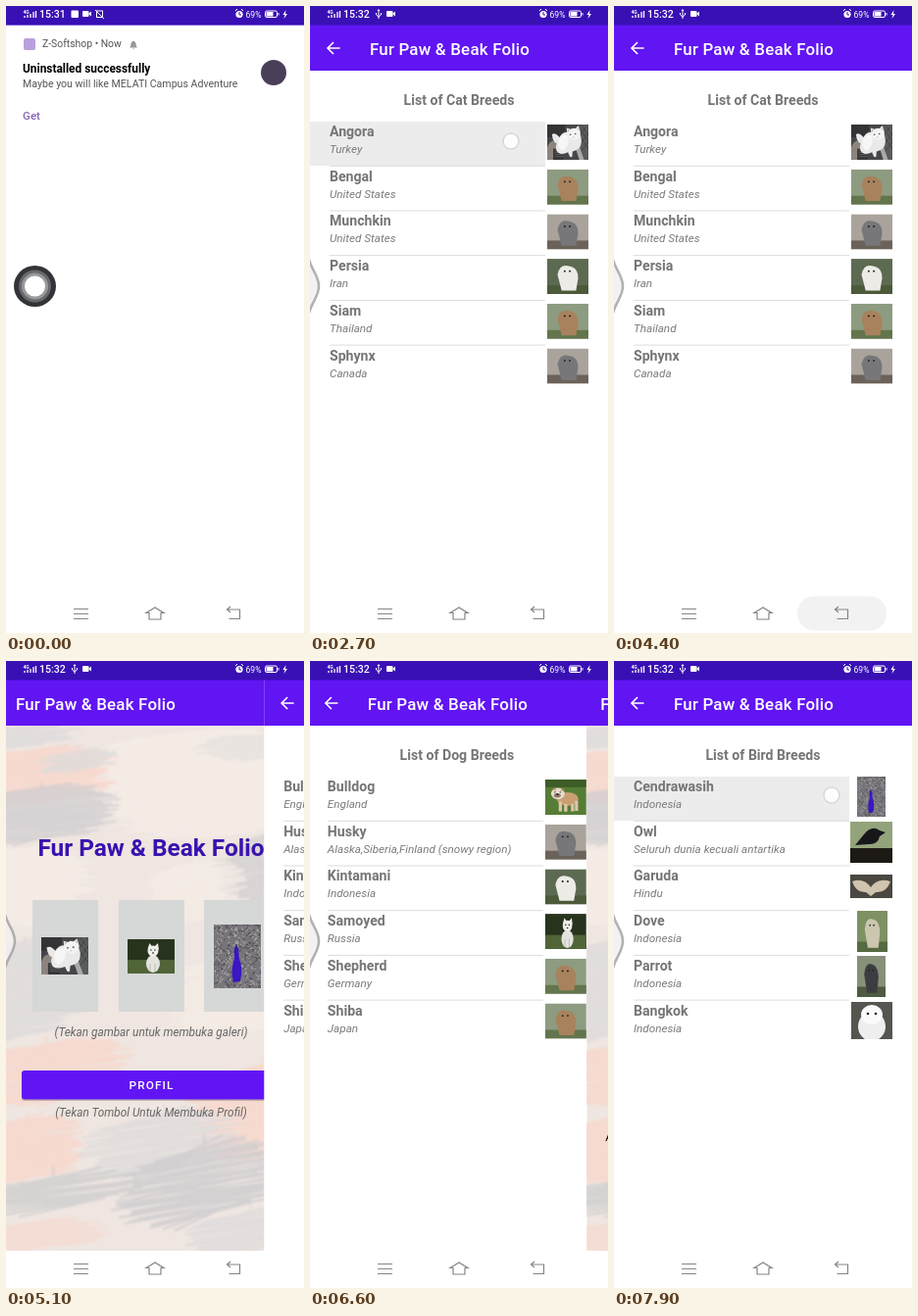
An HTML page for the animation above (8000 ms loop, 304 by 640 pixels).

```html
<!DOCTYPE html>
<html lang="id">
<head>
<meta charset="utf-8">
<title>Pet guide app</title>
<style>
html, body { margin: 0; width: 100%; height: 100%; overflow: hidden; background: #fff }
svg { display: block }
#stage { width: 304px; height: 640px; font-family: Roboto, "Open Sans", sans-serif }
.b { font-weight: 700 }
.m { font-weight: 500 }
.i { font-style: italic }
.c { text-anchor: middle }
.bar { font-weight: 500; letter-spacing: .2px }
</style>
</head>
<body>
<svg id="stage" viewBox="0 0 304 640"></svg>
<script>
const LOOP = 8000, W = 304, SLIDE = 300;
const APP = 'Fur Paw &amp; Beak Folio';

let seed = 7;
const rnd = () => (seed = (seed * 16807) % 2147483647) / 2147483647;

const text = (x, y, size, str, cls = '', fill = '#000') =>
  `<text x="${x}" y="${y}" font-size="${size}" class="${cls}" fill="${fill}">${str}</text>`;
const rect = (x, y, w, h, fill, more = '') =>
  `<rect x="${x}" y="${y}" width="${w}" height="${h}" fill="${fill}" ${more}/>`;
const path = (d, fill, more = '') => `<path d="${d}" fill="${fill}" ${more}/>`;
const line = (d, stroke, width = 1, more = '') =>
  path(d, 'none', `stroke="${stroke}" stroke-width="${width}" ${more}`);
const oval = (x, y, rx, ry, fill, more = '') =>
  `<ellipse cx="${x}" cy="${y}" rx="${rx}" ry="${ry}" fill="${fill}" ${more}/>`;
const pic = (id, x, y, w, h) =>
  `<use href="#${id}" x="${x}" y="${y}" width="${w}" height="${h}"/>`;
const symbol = (id, w, h, body) =>
  `<symbol id="${id}" viewBox="0 0 ${w} ${h}" preserveAspectRatio="none">${body}</symbol>`;

// A dry brush patch: thin rows with ragged ends
function patch(x, y, w, h, color, slope = 0, opacity = .8) {
  let d = '';
  for (let r = 0; r < h; r += 1.5) {
    const u = 2 * r / h - 1;
    const half = w / 2 * Math.sqrt(1 - u ** 4) * (.72 + .38 * rnd());
    const cx = x + w / 2 + (rnd() - .5) * 12;
    d += `M${(cx - half).toFixed(1)} ${(y + r - slope / 2).toFixed(1)}l${(2 * half).toFixed(1)} ${slope}`;
  }
  return line(d, color, 2, `opacity="${opacity}"`);
}

function scratches(n, w, h, color) {
  let d = '';
  for (let k = 0; k < n; k++)
    d += `M${(rnd() * w).toFixed(1)} ${(rnd() * h).toFixed(1)}l${(rnd() * 7 - 3.5).toFixed(1)} ${(rnd() * 7 - 3.5).toFixed(1)}`;
  return line(d, color, .7);
}

const PEACH = '#f8d6cb', GREY = '#cfcdcf', PALE = '#dedbdb', CREAM = '#f6ede6';
const wall = rect(0, 66, W, 536, '#efe6e1') + `<g filter="url(#soft)">` +
  patch(90, 70, 230, 110, CREAM, -6) +
  patch(-30, 88, 140, 56, PEACH, -8) +
  patch(-30, 66, 105, 22, PALE, -6) +
  patch(-40, 128, 150, 56, GREY, -10, .75) +
  patch(40, 92, 75, 20, PALE, -8) +
  patch(205, 74, 120, 26, PALE, -5, .5) +
  patch(222, 172, 110, 120, GREY, -14, .7) +
  patch(150, 205, 95, 60, CREAM, -8) +
  patch(-30, 190, 120, 80, CREAM, -5) +
  patch(-40, 285, 120, 100, PALE, -10) +
  patch(170, 300, 150, 80, CREAM, -8, .7) +
  patch(-30, 388, 160, 62, PEACH, -12) +
  patch(195, 410, 140, 95, PEACH, -14) +
  patch(-30, 465, 110, 65, PEACH, -10) +
  patch(85, 462, 150, 60, PALE, -20) +
  patch(-20, 524, 150, 36, GREY, -18, .8) +
  patch(118, 495, 170, 75, GREY, -26, .85) +
  patch(-20, 570, 120, 30, PEACH, -8, .55) +
  patch(190, 560, 130, 42, PALE, -14) + '</g>';

const catPhoto = rect(0, 0, 208, 165, '#464548') +
  rect(0, 0, 90, 60, '#343336') + rect(165, 0, 43, 165, '#5a5b5c') +
  line('M170 0l38 50M165 20l43 58M165 55l43 58M205 0l-40 50M208 40l-43 55M208 80l-40 50', '#2a2a2c', 2) +
  path('M0 165V110Q10 72 45 75L75 165Z', '#8d847d') +
  path('M30 114h45l8 51H30Z', '#38383a') +
  line('M36 122h36M37 131h38M38 140h40M39 149h42', '#808080', 2) +
  path('M140 100L160 95L186 165H162Z', '#aaa9a9') +
  path('M24 46Q38 38 52 50L62 60Q76 34 104 36L150 30Q176 48 172 85Q170 118 128 126L126 150Q117 157 112 146L105 130Q70 144 52 130Q38 112 48 88Q28 84 24 46Z', '#e9e9e9') +
  path('M58 70Q76 40 105 52Q118 95 80 122Q52 118 58 70Z', '#f6f6f6') +
  path('M98 16L118 22Q130 14 143 18L158 5Q165 22 168 42Q160 70 132 72Q104 66 101 40Z', '#f4f4f4') +
  path('M102 21l12 4-10 10ZM157 11l5 18-12-8Z', '#c9b9b6') +
  oval(117, 47, 4.5, 3.5, '#555a5c') + oval(142, 44, 4.5, 3.5, '#555a5c') +
  oval(132, 58, 3, 2, '#b99a98') + line('M132 60q-4 5-8 3M132 60q5 4 9 1', '#aaa');

const dogPhoto = rect(0, 0, 48, 35, '#28331d') + rect(0, 21, 48, 14, '#506438') +
  oval(26, 25, 7, 9, '#e4e4df') + oval(26, 12, 5.5, 5.5, '#efefea') +
  path('M20.5 10l2-6 3 4ZM27 8l4-4 1 7Z', '#efefea') +
  line('M23 25v8M28 25v8', '#bdbdb5', 1) +
  oval(24, 11, .8, .8, '#222') + oval(28, 11, .8, .8, '#222') + oval(26, 14, 1, .8, '#222');

const birdPhoto = rect(0, 0, 48, 65, '#77757a') +
  scratches(190, 48, 65, '#bdbbb8') + scratches(160, 48, 65, '#3b3a3d') +
  path('M21 24q2-3 4 0l1 11q4 8 1 23l-7 1q-3-14 1-24Z', '#3a16c4') +
  line('M23 24v-4', '#241070', 1);

const bulldogPhoto = rect(0, 0, 168, 166, '#567d35') + rect(0, 0, 168, 36, '#3d5c28') +
  oval(92, 92, 44, 32, '#c99f72') + oval(52, 66, 28, 27, '#e9dccb') +
  path('M28 48l10-10 8 12ZM62 48l12-8 3 18Z', '#b98a5c') +
  line('M62 104v46M84 115v36M112 114v36M128 100v48', '#dcc7ac', 13) +
  oval(50, 75, 14, 10, '#8f7a68') + oval(50, 70, 5, 4, '#222') +
  oval(40, 59, 3, 3, '#222') + oval(62, 59, 3, 3, '#222');

const plain = (back, body, ground) => rect(0, 0, 40, 40, back) + rect(0, 30, 40, 10, ground) +
  path('M10 18Q12 6 20 8Q30 9 30 22L28 36H14Z', body) + oval(17, 14, 1, 1, '#222') + oval(22, 14, 1, 1, '#222');

const defs = `<defs>
  <filter id="soft"><feGaussianBlur stdDeviation=".8"/></filter>
  <clipPath id="body"><rect y="0" width="304" height="602"/></clipPath>` +
  symbol('cat', 208, 165, catPhoto) + symbol('dog', 48, 35, dogPhoto) +
  symbol('bird', 48, 65, birdPhoto) + symbol('bulldog', 168, 166, bulldogPhoto) +
  symbol('crow', 43, 42, rect(0, 0, 43, 42, '#93a47c') + rect(0, 27, 43, 15, '#1d1914') +
    path('M5 24L14 13Q22 3 30 9L36 11L30 15Q28 24 18 23Z', '#17171a')) +
  symbol('wings', 43, 24, rect(0, 0, 43, 24, '#4b4741') +
    path('M2 7Q14 3 21 13Q28 3 41 7Q37 19 26 18L21 22L16 18Q6 19 2 7Z', '#cfc4ae')) +
  symbol('dove', 40, 40, plain('#7e9163', '#cbc6ae', '#566a41')) +
  symbol('parrot', 40, 40, plain('#879079', '#3c3d40', '#4e5a44')) +
  symbol('snow', 42, 38, rect(0, 0, 42, 38, '#54564f') + oval(21, 25, 14, 15, '#eee') +
    oval(21, 13, 11, 10, '#fafafa') + oval(17, 12, 1.3, 1.3, '#222') + oval(25, 12, 1.3, 1.3, '#222')) +
  symbol('brown', 40, 40, plain('#8d9b80', '#a8825c', '#62754c')) +
  symbol('white', 40, 40, plain('#5d6a52', '#ecebe6', '#4c5a3a')) +
  symbol('gray', 40, 40, plain('#a9a39c', '#77777a', '#6b625a')) + '</defs>';

const header = x => rect(0, 0, W, 19.5, '#3810b4') + rect(0, 19, W, 47, '#6115f3') +
  text(x, 49.5, 16.9, APP, 'bar', '#fff');

const page = (id, body) => `<g id="${id}"><g clip-path="url(#body)">${body}</g></g>`;

const card = (x, photo) => rect(x, 244, 67, 114, '#d6d7d7') + photo;
const home = page('home', wall + header(14) +
  text(152, 199, 24.4, APP, 'b c', '#3912ae') +
  card(31, pic('cat', 40, 282, 48, 38)) +
  card(119, pic('dog', 128, 284, 48, 35)) +
  card(206, pic('bird', 216, 269, 48, 65)) +
  text(152, 383, 11.8, '(Tekan gambar untuk membuka galeri)', 'i c', '#666') +
  rect(20, 419, 264, 30, '#0003', 'rx="3"') + rect(20, 418, 264, 29.5, '#6115f5', 'rx="3"') +
  `<g letter-spacing="1.1">${text(152.5, 437, 11.8, 'PROFIL', 'm c', '#fff')}</g>` +
  text(152, 465, 11.8, '(Tekan Tombol Untuk Membuka Profil)', 'i c', '#666'));

// rows: name, place, photo and, where it is not the usual box, its rectangle
const list = (id, kind, rows) => page(id, rect(0, 0, W, 602, '#fff') + header(61) +
  line('M30.5 43H18M24 37l-6 6 6 6', '#fff', 1.6) +
  text(152, 101, 14.1, `List of ${kind} Breeds`, 'b c', '#757575') +
  rect(0, 118, 240, 45, '#ececec', `id="${id}Press"`) +
  rows.map(([name, place, photo, box], k) => {
    const y = 45.7 * k;
    return text(20, 133 + y, 14.1, name, 'b', '#757575') +
      text(20, 150 + y, 11.7, place, 'i', '#7b7b7b') +
      pic(photo, ...(box || [242, 121 + y, 42, 36])) +
      (k < 5 ? line(`M20 ${163.3 + y}H240`, '#dcdcdc') : '');
  }).join(''));

const lists =
  list('cats', 'Cat', [['Angora', 'Turkey', 'cat'], ['Bengal', 'United States', 'brown'],
    ['Munchkin', 'United States', 'gray'], ['Persia', 'Iran', 'white'],
    ['Siam', 'Thailand', 'brown'], ['Sphynx', 'Canada', 'gray']]) +
  list('dogs', 'Dog', [['Bulldog', 'England', 'bulldog'], ['Husky', 'Alaska,Siberia,Finland (snowy region)', 'gray'],
    ['Kintamani', 'Indonesia', 'white'], ['Samoyed', 'Russia', 'dog'],
    ['Shepherd', 'Germany', 'brown'], ['Shiba', 'Japan', 'brown']]) +
  list('birds', 'Bird', [['Cendrawasih', 'Indonesia', 'bird', [248, 118, 29, 41]],
    ['Owl', 'Seluruh dunia kecuali antartika', 'crow', [241, 164, 43, 42]],
    ['Garuda', 'Hindu', 'wings', [241, 218, 43, 24]],
    ['Dove', 'Indonesia', 'dove', [248, 255, 31, 42]],
    ['Parrot', 'Indonesia', 'parrot', [248, 301, 29, 42]],
    ['Bangkok', 'Indonesia', 'snow', [242, 348, 42, 38]]]);

const detail = (id, kind, name, place, photo, dy, lines) => page(id, wall + header(14) +
  text(152, 205 + dy, 16.5, kind, 'c', '#4513ae') + photo +
  text(152, 424 + dy, 14.2, name, 'c', '#4513ae') +
  text(152, 440.5 + dy, 11.7, place, 'i c') +
  lines.map((s, k) => text(152, 463 + dy + 13.6 * k, 11.7, s, 'c')).join(''));

const details =
  detail('angora', 'Cat', 'Angora', 'Turkey', pic('cat', 48, 230, 208, 165), 0,
    ['Originated in Ankara, Turkey. It has a very distinct', 'characteristics of long and smooth fur']) +
  detail('bull', 'Dog', 'Bulldog', 'England', pic('bulldog', 68, 202, 168, 166), -27.5,
    ['The Bulldog, also known as the English Bulldog or', 'British Bulldog, is a medium sized dog breed. It is',
     'a muscular, hefty dog with a wrinkled face and a', 'distinctive pushed-in nose, and it is well loved by',
     'American, British and many other dog families now.']);

const camera = x => rect(x, 5, 6.5, 6, '#fff', 'rx="1"') + path(`M${x + 6} 8l3-2.5v5Z`, '#fff');
const status = text(17.5, 8, 5, '4G', 'b', '#fff') +
  line('M19 12v-2M22 12v-3M25 12V8M28 12V6M30.5 12V5', '#fff', 1.3) +
  `<text id="clock" x="34" y="12" font-size="10.6" class="m" fill="#fff"></text>` +
  `<g id="early">${rect(66.5, 4.5, 7.5, 7.5, '#fff', 'rx="1"')}${camera(78)}${rect(92.5, 5, 6, 6.5, 'none', 'stroke="#fff"')}${line('M91 4l9 9', '#fff')}</g>` +
  `<g id="late">${line('M70 13V4M67.5 7v2l2.500 2 2.500-2V7', '#fff')}${path('M68.500 5l1.500-2 1.500 2Z', '#fff')}${camera(78)}</g>` +
  oval(238, 8.5, 3.6, 3.6, '#fff') + line('M238 6v3h2', '#3810b4') + line('M234 5l2-2M242 5l-2-2', '#fff') +
  text(244.5, 11.5, 8.6, '69%', '', '#fff') +
  rect(264.5, 5, 12, 6.5, 'none', 'stroke="#fff" rx="1.5"') + rect(265.5, 6, 7, 4.5, '#fff') + rect(277.5, 7, 1, 2.5, '#fff') +
  path('M285.500 4l-3 5h2l-1 4 3.500-5h-2Z', '#fff');

const nav = rect(0, 602, W, 38, '#fff') + rect(187, 602.5, 91, 35, '#f2f2f2', 'rx="17" id="ripple"') +
  line('M69 615.500h15M69 620.500h15M69 625.500h15', '#858585', 1.2) +
  line('M143 619.500l9-5.500 9 5.500h-3v6.500h-12v-6.500Z', '#858585', 1.2) +
  line('M229 613l-3.500 3 3.500 3M226 616h12.500v9.500h-11', '#858585', 1.2);

const notice = rect(0, 19.5, W, 112, '#fff') + rect(18, 33, 12, 12, '#b9a0dc', 'rx="2"') +
  text(37, 42, 10.4, 'Z-Softshop • Now', '', '#555') +
  path('M126 42.500q1.500-1 1.500-4.500q2.500-5 5 0q0 3.500 1.500 4.500ZM128.800 43.500h2.400l-1.200 1Z', '#999') +
  text(17, 68, 11.9, 'Uninstalled successfully', 'b') +
  text(17, 83, 10.6, 'Maybe you will like MELATI Campus Adventure', '', '#555') +
  text(17, 116, 11.6, 'Get', 'm', '#8764b4') + oval(273, 68, 13, 13, '#4a3f58');

const ball = oval(29.500, 286, 21.500, 21, '#333438') + oval(29.500, 286, 16.500, 16.500, '#68696c') +
  oval(29.500, 286, 13.500, 13.500, '#98999b') + oval(29.500, 286, 10.500, 10.500, '#fff');
const dock = path('M-2 254C0 269 9 274 9 286S0 303-2 318Z', '#f1f0f0', 'stroke="#a5a3a5" stroke-width="2.500"');

document.getElementById('stage').innerHTML = defs + rect(0, 0, W, 640, '#fff') +
  rect(0, 0, W, 19.5, '#3810b4') + home + lists + details +
  `<g id="notice">${notice}</g>` + rect(0, 0, W, 19.5, '#3810b4') + status + nav +
  `<g id="ball">${ball}</g><g id="dock">${dock}</g>` +
  oval(0, 0, 8, 8, '#fff', 'id="touch" stroke="#d8d4d4" stroke-width="1.500" opacity=".9"');

const el = {};
document.querySelectorAll('#stage [id]').forEach(n => el[n.id] = n);

// page, page below, time it slides in, time it slides out
const visits = [
  ['cats', 'home', 1900, 4400], ['angora', 'cats', 2750, 3850],
  ['dogs', 'home', 5032, 6800], ['bull', 'dogs', 5907, 6350],
  ['birds', 'home', 7420, Infinity]
];
// start, end, x, y
const taps = [[1750, 1880, 64, 301], [2600, 2740, 205, 138], [4880, 5020, 152, 302],
  [5760, 5890, 205, 138], [7320, 7410, 240, 302], [7820, 8000, 222, 137]];
const backs = [3700, 4250, 6290, 6720];
const presses = { cats: [2600, 2850], dogs: [5760, 5930], birds: [7820, 8000] };

const clamp = v => Math.max(0, Math.min(1, v));
const ease = (t, from, span) => { const u = clamp((t - from) / span); return u * u * (3 - 2 * u); };
const show = (node, on) => node.style.display = on ? '' : 'none';
const move = (node, x, y) => node.setAttribute('transform', `translate(${x} ${y})`);

function draw(t) {
  const x = { home: 0 };
  for (const [id, below, open, close] of visits) {
    const p = ease(t, open, SLIDE) - ease(t, close, SLIDE);
    x[id] = W * (1 - p);
    x[below] -= 30 * p;
  }
  for (const id in x) {
    move(el[id], x[id], 0);
    show(el[id], x[id] < W);
  }
  el.home.setAttribute('opacity', clamp((t - 250) / 200));
  for (const id in presses) show(el[id + 'Press'], t >= presses[id][0] && t < presses[id][1]);

  const early = t < 400;
  el.clock.textContent = early ? '15:31' : '15:32';
  show(el.early, early);
  show(el.late, !early);
  move(el.notice, 0, -135 * ease(t, 600, 250));
  show(el.notice, t < 850);

  const q = ease(t, 750, 250);
  move(el.ball, -40 * q, 0);
  el.ball.setAttribute('opacity', 1 - q);
  el.dock.setAttribute('opacity', q * .85);

  show(el.ripple, backs.some(b => t >= b && t < b + 230));
  const tap = taps.find(a => t >= a[0] && t < a[1]);
  show(el.touch, tap);
  if (tap) move(el.touch, tap[2], tap[3]);
}

const start = performance.now();
function tick() {
  draw((performance.now() - start) % LOOP);
  requestAnimationFrame(tick);
}
tick();
</script>
</body>
</html>
```
